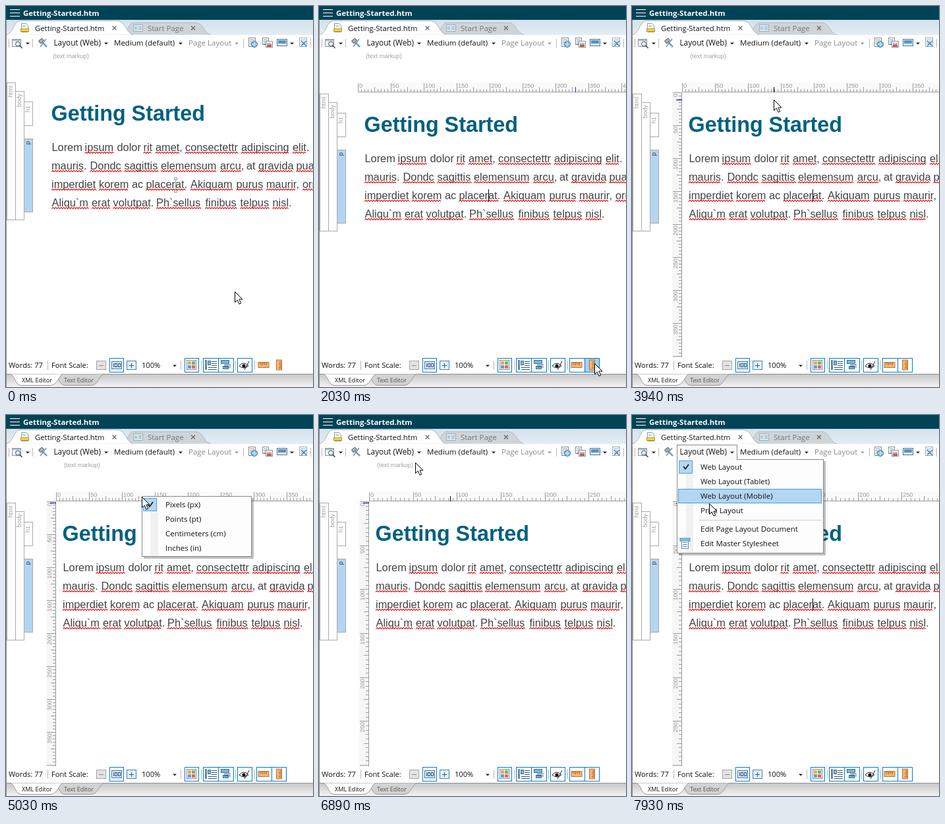
Animation of 466x578 px, one loop 8 s. Source, as an HTML page:

```html
<!DOCTYPE html>
<html lang="en">
<head>
<meta charset="utf-8">
<title>Rulers in the editor</title>
<style>
html, body { margin: 0; width: 100%; height: 100%; overflow: hidden; background: #fff; }
svg { display: block; width: 466px; height: 578px; }
text { font: 11.5px 'Open Sans', 'Noto Sans', sans-serif; fill: #111; white-space: pre; }
.doc text, .small, .ruler text { font-family: 'Liberation Sans', Arial, sans-serif; }
.doc text { font-size: 16.35px; fill: #424242; }
.doc .title { font-size: 32.35px; font-weight: bold; fill: #006080; }
.small { font-size: 9.3px; fill: #a0a0a0; }
.ruler text { font-size: 9.3px; fill: #999; }
.ruler path { stroke: #9a9a9a; fill: none; }
.status text { font-size: 11.15px; }
.status .tab { font-size: 9.1px; }
</style>
</head>
<body>
<svg id="stage" viewBox="0 0 466 578">
  <defs>
    <linearGradient id="strip" x2="0" y2="1"><stop stop-color="#d3e1ec"/><stop offset="1" stop-color="#e4edf4"/></linearGradient>
    <linearGradient id="foot" x2="0" y2="1"><stop stop-color="#c6c6c6"/><stop offset="1" stop-color="#f3f3f3"/></linearGradient>
  </defs>
</svg>
<script>
const stage = document.getElementById('stage');
const LOOP = 8000, BLUE = '#0078d7', HOVER = '#b3d7f3';

const rect = (x, y, w, h, fill = 'none', stroke = 'none', extra = '') =>
  `<rect x="${x}" y="${y}" width="${w}" height="${h}" fill="${fill}" stroke="${stroke}" ${extra}/>`;
const box = (x, y, w, h, fill, stroke, extra) => rect(x + .5, y + .5, w - 1, h - 1, fill, stroke, extra);
const path = (d, stroke = '#333', fill = 'none', width = 1) =>
  `<path d="${d}" stroke="${stroke}" fill="${fill}" stroke-width="${width}"/>`;
const text = (x, y, s, attrs = '') => `<text x="${x}" y="${y}" ${attrs}>${s}</text>`;
const group = (id, body, cls = '') => `<g id="${id}" class="${cls}">${body}</g>`;
const arrow = (x, y, fill = '#222') => path(`M${x - 3} ${y - 1.5}h6l-3 3z`, 'none', fill);
const lines = (x, y, w, n, gap, color) =>
  path(Array.from({ length: n }, (_, i) => `M${x} ${y + i * gap}h${w}`).join(''), color);
const divider = (x, y, h) => path(`M${x + .5} ${y}v${h}`, '#b8b8b8');
const cross = x => path(`M${x - 3} 30.5l6 6m0 -6l-6 6`, '#666', 'none', 1.2);
const page = (x, y, w, h, color) => box(x, y, w, h, '#fff', color) + lines(x + 2, y + 3.5, w - 4, 3, 3, color);

function header() {
  return rect(0, 0, 466, 21, '#004356') +
    path('M6 5.5h15M6 10.5h15M6 15.5h15', '#fff', 'none', 1.2) +
    text(26, 15, 'Getting-Started.htm', 'style="font-weight:bold;font-size:11.45px;fill:#fff"') +
    rect(0, 21, 466, 23, 'url(#strip)') +
    path('M176 43.5C184 42 185 26.5 193 25.5H289C300 26.5 300 41 311 43.5', '#b4bac0', '#cfd4d8') +
    path('M0 43.5C12 42 11 23.5 21 22.5H170C182 24 182 41 193 43.5', '#a9b4bd', '#fff') +
    path('M23.5 26.5h7l3 3v10h-10z', '#8796a5', '#fff') + lines(25, 29.5, 5, 2, 2, '#9fb8d0') +
    rect(22.5, 34.5, 12, 4, '#f7d24a', '#c39a1c') +
    text(44, 38, 'Getting-Started.htm', 'style="font-size:11.35px"') + cross(164.5) +
    box(193, 28, 15, 11, '#dce8ef', '#9eb0bd') + rect(195, 31, 4, 5, '#a9cce0') + lines(201, 31.5, 5, 3, 2, '#9eb0bd') +
    text(215, 38, 'Start Page', 'style="fill:#777"') + cross(284);
}

function toolbar() {
  return divider(4, 50, 13) +
    box(9, 50, 14, 12, '#eef1f3', '#8b98a2') + rect(10, 51, 12, 2, '#a9bac6') +
    '<circle cx="18" cy="57.5" r="3.5" fill="#dff0fa" stroke="#555"/>' + path('M20.5 60l4 4', '#555', 'none', 1.7) +
    arrow(33, 57) + divider(40, 50, 13) +
    group('layoutButton', box(68, 45, 92, 24, '#fafafa', '#8a8a8a')) +
    path('M55 55l7 7', '#6fa5cc', 'none', 2.6) + path('M49.5 53l5 -4l3 3l-5 5z', '#444', '#a9b5be') +
    path('M61 50l-9 12', '#7d8890', 'none', 1.3) +
    text(72.5, 60, 'Layout (Web)', 'style="font-size:11.75px"') + arrow(152, 57) +
    text(164, 60, 'Medium (default)') + arrow(265, 57) +
    text(277, 60, 'Page Layout', 'style="fill:#888"') + arrow(350, 57, '#999') + divider(360, 50, 13) +
    page(368, 48, 11, 14, '#7b8d9a') + '<circle cx="377" cy="58" r="4.5" fill="#7dbbe3" stroke="#2d6d9c"/>' +
    path('M373 58h8m-4 -4v8', '#e4f2fb') +
    page(389, 48, 10, 11, '#7b8d9a') + page(394, 53, 11, 10, '#7b8d9a') + rect(396, 58, 7, 4, '#cf5d55') +
    box(411, 50, 16, 11, '#d9ecf8', '#56748b') + rect(413, 52, 12, 5, '#5b93c4') + arrow(434, 57) +
    page(445, 48, 12, 14, '#8fa9bb') + path('M448 53l8 8m0 -8l-8 8', '#4684b5', 'none', 1.5) + divider(462, 50, 13);
}

function tag(name, x, y, h, pad, fill = '#fff', color = '#a0a0a0') {
  return box(x, y, 14, h, fill, '#a9a9a9') +
    `<text class="small" style="fill:${color}" text-anchor="end" transform="translate(${x + 8.5} ${y + pad}) rotate(-90)">${name}</text>`;
}

// word:x, with :~ for a misspelling
const prose = [
  "Lorem:69 ipsum:119:~ dolor:168 rit:208:~ amet,:226.5:~ consectettr:271.5:~ adipiscing:356.5:~ elit.:434.5:~",
  "mauris.:68.5:~ Dondc:127:~ sagittis:179:~ elemensum:234.5:~ arcu,:324.5:~ at:364.5 gravida:382.5:~ puam:440:~",
  "imperdiet:68.5:~ korem:140.5:~ ac:190.5 placerat.:212:~ Akiquam:279.5:~ purus:349:~ maurir,:394.5:~ orna:449.5:~",
  "Aliqu`m:69:~ erat:129.5:~ volutpat.:162:~ Ph`sellus:227.5:~ finibus:302:~ telpus:355:~ nisl.:404:~"
];
function article() {
  const words = prose.map((row, i) => row.split(' ').map(item => {
    const [word, x, wrong] = item.split(':');
    return text(+x + .5, 220 + 28 * i, word, wrong ? 'data-wrong' : '');
  }).join('')).join('');
  return text(68.5, 174, 'Getting Started', 'class="title"') + words;
}
function addSquiggles() {
  for (const word of stage.querySelectorAll('[data-wrong]')) {
    const width = word.getSubStringLength(0, word.textContent.replace(/[.,]/, '').length);
    const d = `M${word.getAttribute('x')} ${+word.getAttribute('y') + 3.5}` + 'l2 -2l2 2'.repeat(Math.round(width / 4));
    word.insertAdjacentHTML('afterend', path(d, '#f01818', 'none', 1.15));
  }
}

function ruler(unit, length, vertical) {
  let d = vertical ? `M14.5 0V${length}` : `M0 14.5H${length}`, labels = '';
  for (let i = 0; i * 5 * unit < length; i++) {
    const p = Math.round(i * 5 * unit), size = i % 10 === 0 ? 13 : i % 5 === 0 ? 7 : 4;
    d += vertical ? `M14 ${p + .5}h-${size}` : `M${p + .5} 14v-${size}`;
    if (i % 10) continue;
    labels += vertical
      ? `<text text-anchor="end" transform="translate(8 ${p + 2}) rotate(-90)">${i * 5}</text>`
      : text(p + 2, 8, i * 5);
  }
  return (vertical ? rect(0, 0, 15, length, '#f6f6f6') : rect(0, 0, length, 15, '#fafafa')) + path(d) + labels;
}

const check = (x, y) => box(x, y, 21, 20, HOVER, '#5b9fd3') + path(`M${x + 7} ${y + 9}l3 4l5 -7`, '#111', 'none', 1.6);
const panel = (x, y, w, h) => rect(x + 3, y + 3, w, h, '#000', 'none', 'opacity=".25"') +
  box(x, y, w, h, '#fdfdfd', '#8a8a8a');
const items = (x, y, names) => names.map((s, i) => text(x, y + 22 * i, s)).join('');

function unitMenu() {
  return panel(206, 123, 167, 92) + rect(219, 125, 12, 88, '#f1f1f1') +
    group('unitHover', box(208, 147, 162, 21, HOVER, '#4a9ad4')) + check(208, 126) +
    items(242, 140, ['Pixels (px)', 'Points (pt)', 'Centimeters (cm)', 'Inches (in)']);
}
function layoutMenu() {
  return panel(68, 67, 223, 143) + rect(69, 65, 90, 4, '#fafafa') + rect(82, 69, 11, 139, '#f1f1f1') +
    group('layoutHover', box(70, 68, 218, 22, HOVER, '#4a9ad4')) + check(71, 69) +
    items(104, 83, ['Web Layout', 'Web Layout (Tablet)', 'Web Layout (Mobile)', 'Print Layout']) +
    path('M101 159.5H288', '#c9c9c9') + items(104, 177, ['Edit Page Layout Document', 'Edit Master Stylesheet']) +
    page(75, 190, 11, 13, '#4f8fb8') + rect(73, 187, 15, 4, '#8ac0e0', '#4f8fb8');
}

const toggle = (x, w) => box(x, 534, w, 22, '#fff', BLUE);
function statusBar() {
  const wideIcon = rect(383, 540.5, 16, 8, '#f5b573', '#bb7430') + path('M386 541v3m3 -3v4m3 -4v3m3 -3v4', '#8d5219');
  const tallIcon = rect(410.5, 537, 8, 15, '#f5b573', '#bb7430') + path('M418 540h-3m3 3h-4m4 3h-3m3 3h-4', '#8d5219');
  const swatches = ['#f0a83c', '#6cb868', '#5a9fe0', '#e0695c']
    .map((c, i) => rect(276 + i % 2 * 6, 539 + (i >> 1) * 6, 5, 5, c)).join('');
  return rect(0, 533, 466, 45, '#fff') +
    text(4, 549, 'Words: 77') + divider(63, 538, 14) + text(69, 549, 'Font Scale:') +
    box(137, 538, 15, 14, '#e3e3e3', '#a5a5a5') + path('M141 545.5h7', '#888') +
    toggle(157, 22) + box(160, 539, 16, 12, '#dcebf5', '#3f74a8') + path('M163.5 542v6', '#234f8a') +
    rect(165.5, 542.5, 3, 5, 'none', '#234f8a') + rect(170.5, 542.5, 3, 5, 'none', '#234f8a') +
    box(183, 538, 15, 14, '#e3f0f8', '#4484ad') + path('M187 545.5h7m-3.5 -3.5v7', '#235f88') +
    text(206, 549, '100%') + arrow(256, 546) + divider(265, 538, 14) +
    toggle(271, 22) + box(274, 537, 15, 15, '#fff', '#888') + swatches + divider(296, 538, 14) +
    toggle(299, 24) + toggle(322, 24) +
    path('M303.5 537v15', '#35556d', 'none', 2) + box(306, 538, 5, 7, '#7db6dc', '#35709a') +
    lines(312, 539.5, 8, 3, 3, '#35556d') + lines(307, 548.5, 13, 2, 3, '#35556d') +
    box(326, 537, 13, 6, '#7db6dc', '#35709a') + box(329, 546, 9, 5, '#7db6dc', '#35709a') + lines(331, 544.5, 10, 2, 3, '#35556d') +
    divider(348, 538, 14) + toggle(351, 23) +
    path('M354 546q7 -8 14 0q-7 6 -14 0z', '#222', '#fff') + '<circle cx="361" cy="546" r="2.5"/>' +
    path('M362 552l7 -13', '#222') + divider(377, 538, 14) +
    box(380, 534, 24, 22, 'none', 'none', 'id="wideButton"') + box(403, 534, 23, 22, 'none', 'none', 'id="tallButton"') +
    wideIcon + tallIcon +
    rect(0, 558, 466, 20, 'url(#foot)') + path('M0 558.5H466', '#8f8f8f') +
    path('M76 558.5C80 563 81 575.5 89 575.5H130C140 575 141 561 148 558.5', '#9a9a9a', '#d2d2d2') +
    path('M7 558.5C14 561 14 575.5 23 575.5H68C78 575 80 561 86 558.5', '#9a9a9a', '#fff') +
    text(24, 571, 'XML Editor', 'class="tab"') + text(88, 571, 'Text Editor', 'class="tab" style="fill:#555"') +
    group('tip', box(417, 574, 60, 20, '#fff', '#777'));
}

stage.insertAdjacentHTML('beforeend',
  rect(0, 0, 466, 578, '#fff') +
  group('tags', tag('html', 1, 116, 209, 5) + tag('body', 14, 129, 196, 4) + tag('h1', 27, 145, 37, 6) +
    tag('p', 27, 201, 112, 4, '#b3d5f1', '#333')) +
  group('article', article() +
    group('handles', path('M257.5 263v18', '#aaa') + box(255, 260, 5, 4, '#fff', '#999') + box(255, 279, 5, 4, '#fff', '#999')) +
    group('caret', path('M257.5 261v19', '#000')), 'doc') +
  group('markup', text(71, 79, '(text markup)', 'class="small"')) +
  group('wide', group('widePx', ruler(1, 407)) + group('widePt', ruler(4 / 3, 407)), 'ruler') +
  group('tall', group('tallPx', ruler(1, 402, true)) + group('tallPt', ruler(4 / 3, 402, true)), 'ruler') +
  group('markX', path('M.5 123v8', 'currentColor')) + group('markY', path('M67 .5h9', '#1020e0', 'none', 1.4)) +
  header() + toolbar() + group('status', statusBar(), 'status') +
  path('M.5 21V578', '#8a8a8a') +
  group('unitMenu', unitMenu()) + group('layoutMenu', layoutMenu()) +
  group('pointer', path('M.5 .5V16.5L4.2 13L7 19.2L9.7 18L7 12H12z', '#000', '#fff')));
addSquiggles();

const el = Object.fromEntries([...stage.querySelectorAll('[id]')].map(e => [e.id, e]));
const show = (name, on) => { el[name].style.display = on ? '' : 'none'; };
const move = (name, x, y) => el[name].setAttribute('transform', `translate(${x} ${y})`);
const paint = (name, fill, stroke) => { el[name].setAttribute('fill', fill); el[name].setAttribute('stroke', stroke); };

// start, step count, ms per step, end x, end y
const moves = [
  [290, 6, 138, 388, 538], [1400, 4, 133, 418, 542], [3160, 8, 128, 206, 124], [5170, 2, 150, 243, 153],
  [5740, 9, 125, 185, 105], [6890, 1, 120, 146, 72], [7010, 2, 130, 112, 57], [7540, 4, 130, 117, 134]
];
function pointerAt(t) {
  let x = 347, y = 433;
  for (const [start, count, ms, toX, toY] of moves) {
    if (t < start) break;
    const k = Math.min(1, (Math.floor((t - start) / ms) + 1) / count);
    const ease = k * k * (3 - 2 * k);
    x += (toX - x) * ease;
    y += (toY - y) * ease;
  }
  return [Math.round(x), Math.round(y)];
}

const blinks = [1250, 1530, 2030, 2330, 2610, 3160, 3680, 4330, 4480, 5030, 5470, 5880, 6350, 6890, 7540];
const between = (t, a, b) => t >= a && t < b;
const paintButton = (name, t, hover, leave) =>
  t < hover ? paint(name, 'none', 'none') : paint(name, t < leave ? '#a6d0f2' : '#fff', BLUE);

function render(t) {
  const wide = t >= 1250, tall = t >= 2610;
  const dx = tall ? 17 : 0, dy = wide ? 17 : 0;
  const [x, y] = pointerAt(t);
  move('pointer', x, y);
  move('tags', 0, dy);
  move('article', dx, dy);
  move('markup', dx, 0);
  move('wide', 59 + dx, 116);
  move('tall', 61, 131);
  show('handles', !wide);
  show('caret', blinks.filter(b => b <= t).length % 2 === 1);
  show('wide', wide);
  show('widePx', t < 5470);
  show('widePt', t >= 5470);
  show('tall', tall);
  show('tallPx', t < 5740);
  show('tallPt', t >= 5740);
  show('markX', wide);
  show('markY', tall);
  el.markX.style.color = tall ? '#000' : '#1020e0';
  move('markX', t < 3160 ? 389 : t < 6740 ? x : 199, 0);
  move('markY', 0, t < 3160 ? 531 : Math.min(531, Math.max(133, y)));
  paintButton('wideButton', t, 842, 1533);
  paintButton('tallButton', t, 1533, 3160);
  show('tip', between(t, 2180, 3160));
  show('unitMenu', between(t, 4330, 5470));
  show('unitHover', t >= 5320);
  show('layoutButton', t >= 7010);
  show('layoutMenu', t >= 7270);
  show('layoutHover', t >= 7540);
  move('layoutHover', 0, 22 * Math.min(2, Math.max(0, Math.floor((t - 7540) / 195))));
}

function frame() {
  render(performance.now() % LOOP);
  requestAnimationFrame(frame);
}
frame();
</script>
</body>
</html>
```
